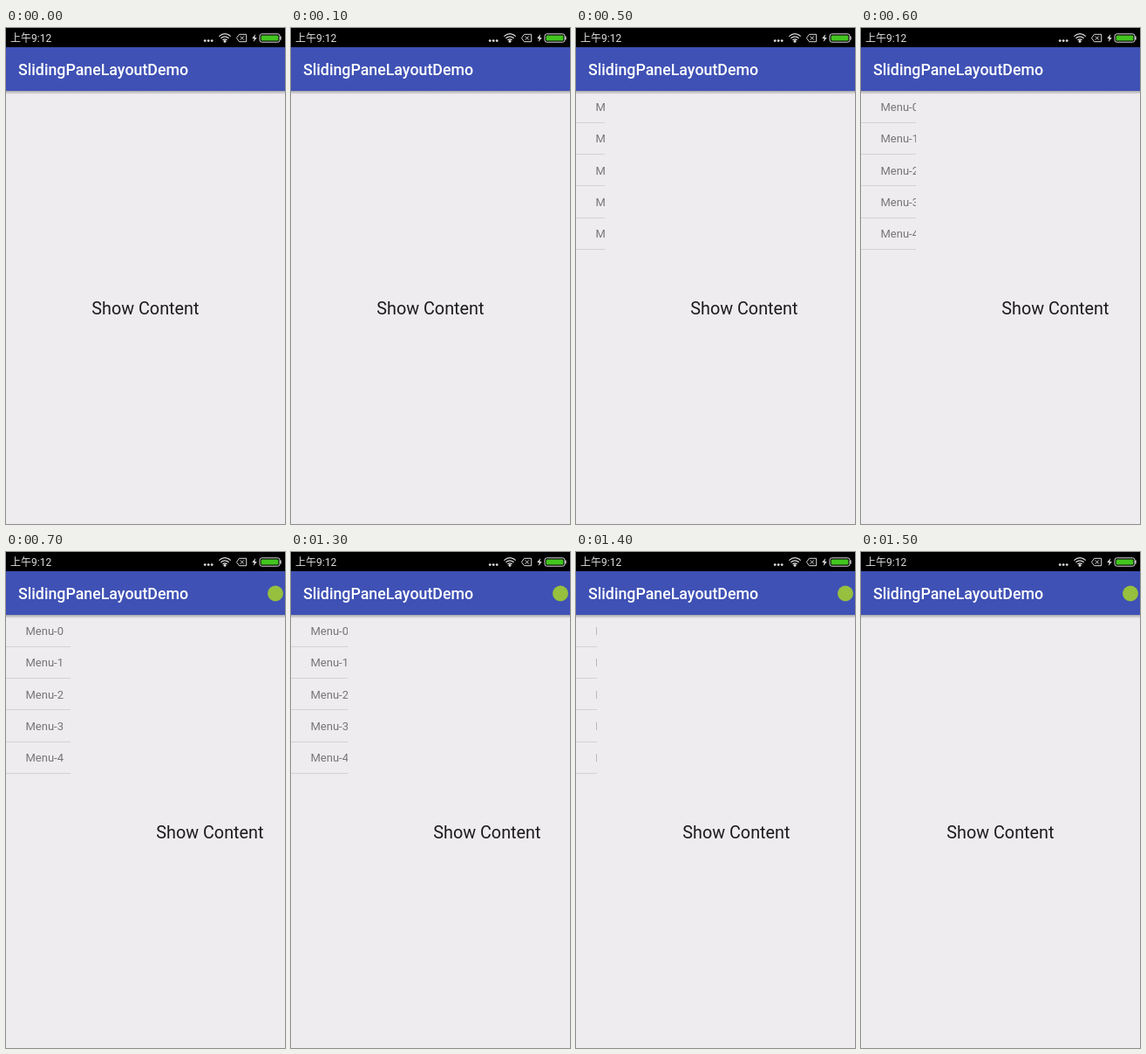
An HTML page that plays this animation: 320x568 px, repeating every 1.6 s.

```html
<!DOCTYPE html>
<html lang="en">
<head>
<meta charset="utf-8">
<title>Sliding pane</title>
<style>
  html, body { margin: 0; width: 100%; height: 100%; overflow: hidden; background: #eeecef; }
  svg { display: block; width: 320px; height: 568px; font-family: Roboto, "Noto Sans", sans-serif; }
</style>
</head>
<body>
<svg viewBox="0 0 320 568">
  <defs>
    <linearGradient id="shade" x2="0" y2="1">
      <stop offset="0" stop-color="#000" stop-opacity=".3"/>
      <stop offset="1" stop-color="#000" stop-opacity="0"/>
    </linearGradient>
    <clipPath id="pane"><rect id="paneBox" y="72" width="0" height="496"/></clipPath>
  </defs>

  <rect width="320" height="568" fill="#eeecef"/>
  <g id="menu" clip-path="url(#pane)" font-size="13" fill="#757477"></g>
  <text id="content" x="98.3" y="327.5" font-size="19.8" fill="#1c1b1d">Show Content</text>

  <rect y="72" width="320" height="4" fill="url(#shade)"/>
  <rect y="22" width="320" height="50" fill="#3f51b5"/>
  <text x="14" y="54" font-size="17.8" font-weight="500" fill="#fff">SlidingPaneLayoutDemo</text>
  <circle id="action" cx="309" cy="47.5" r="9" fill="#96c03d"/>

  <rect width="320" height="22"/>
  <text x="5" y="15.5" font-size="12" fill="#ddd" font-family="Roboto, 'Noto Sans CJK SC', 'Noto Sans CJK', sans-serif">上午9:12</text>
  <g fill="#ddd">
    <circle cx="228.2" cy="14.6" r="1.4"/>
    <circle cx="232.2" cy="14.6" r="1.4"/>
    <circle cx="236.2" cy="14.6" r="1.4"/>
    <circle cx="251" cy="15.2" r="1.5"/>
    <path d="M286.2 7l-4 5h2.4l-.8 4 4-5h-2.4z"/>
    <rect x="314.2" y="9.5" width="1.4" height="4"/>
  </g>
  <g fill="none" stroke="#ddd" stroke-width="1.2">
    <path d="M244.3 9.6q6.7-6 13.4 0M246.4 11.8q4.6-4 9.2 0M248.4 13.8q2.6-2 5.2 0"/>
    <path d="M264.5 11.5l3-4.2h8.2v8.4h-8.2zM268.7 9.4l4.2 4.2M272.9 9.4l-4.2 4.2" stroke-width="1"/>
    <rect x="291" y="6.8" width="23" height="9.4" rx="2.4" stroke-width="1"/>
  </g>
  <rect x="292.6" y="8.4" width="19.8" height="6.2" rx="1.2" fill="#43c51f"/>
</svg>
<script>
  const LOOP = 1600, ROW = 36.4;
  const byId = id => document.getElementById(id);

  // start time in ms, pane offset in px, action shown
  const steps = [
    [0, 0, false],
    [500, 33, false],
    [600, 63, false],
    [700, 74, true],
    [1300, 65, true],
    [1400, 24, true],
    [1500, 0, true]
  ];

  byId('menu').innerHTML = Array.from({ length: 5 }, (_, i) =>
    `<text x="22.5" y="${94.8 + i * ROW}">Menu-${i}</text>
     <rect y="${Math.round(107.6 + i * ROW)}" width="74" height="1" fill="#d3d1d4"/>`).join('');

  function draw(now) {
    const t = now % LOOP;
    const [, offset, action] = steps.findLast(s => s[0] <= t);
    byId('paneBox').setAttribute('width', offset);
    byId('content').setAttribute('transform', `translate(${offset} 0)`);
    byId('action').setAttribute('visibility', action ? 'visible' : 'hidden');
  }

  const start = performance.now();
  function tick() {
    draw(performance.now() - start);
    requestAnimationFrame(tick);
  }
  tick();
</script>
</body>
</html>
```
